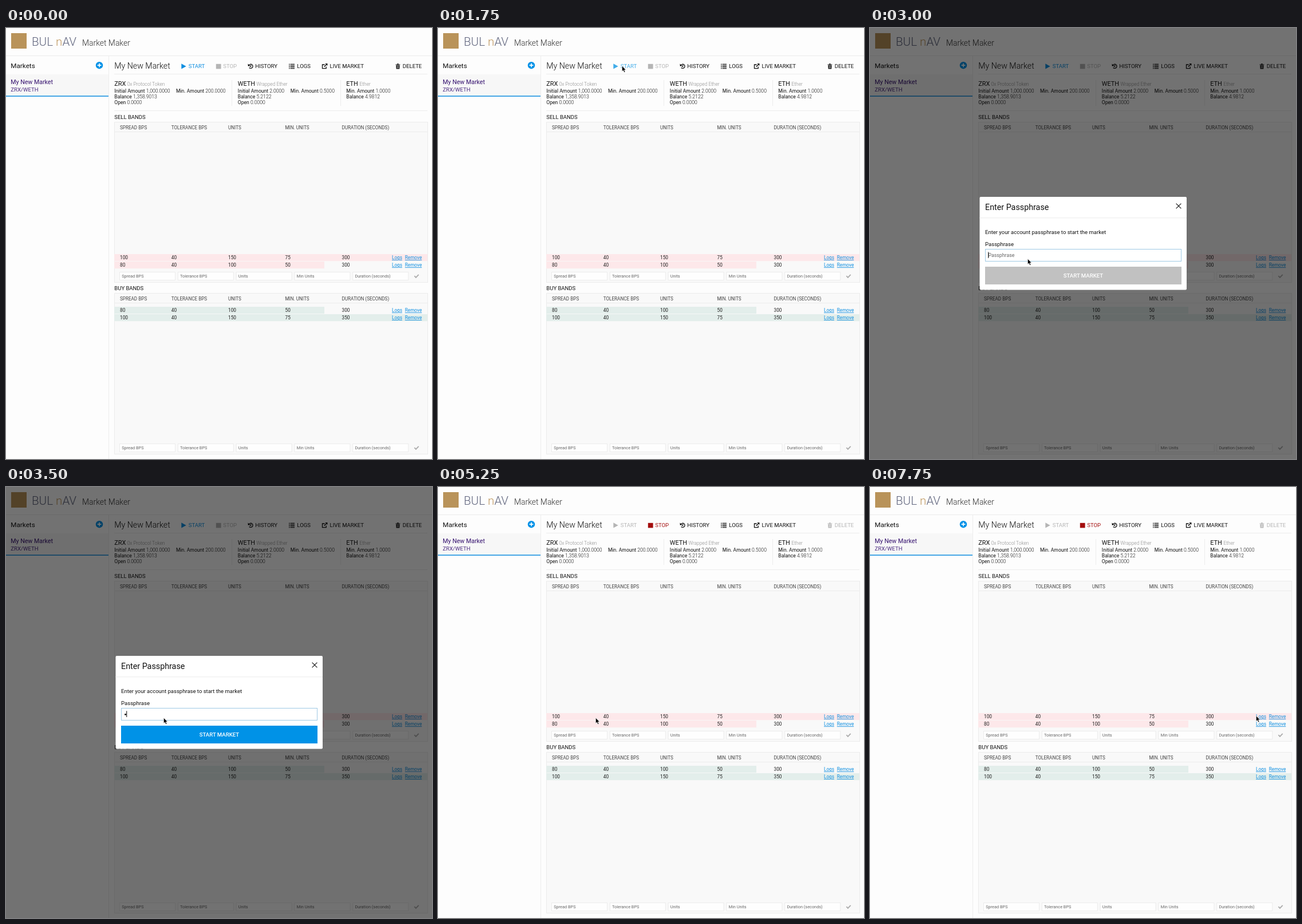
An HTML page that plays this animation: 744x753 px, repeating every 8 s.

```html
<!DOCTYPE html>
<html lang="en">
<head>
<meta charset="utf-8">
<title>Market Maker</title>
<style>
  html, body { margin: 0; width: 100%; height: 100%; overflow: hidden; background: #fdfdfd; }
  svg { display: block; width: 744px; height: 753px; font-family: Roboto, sans-serif; }
  text { white-space: pre; }
  .start { fill: var(--start); }
  .stop { fill: var(--stop); }
  .delete { fill: var(--delete); }
  .link { fill: #0d8ee0; text-decoration: underline; }
  .light { font-weight: 300; }
  .line { fill: none; stroke: #111; stroke-width: 1.3; }
</style>
</head>
<body>
<svg id="stage" viewBox="0 0 744 753"></svg>
<script>
const BLUE = '#0092e7', GREY = '#b5b5b5', RED = '#a30d0d', INK = '#111', RULE = '#ececec';
const LOOP = 8000;

const text = (x, y, size, str, fill = INK, extra = '') =>
  `<text x="${x}" y="${y}" font-size="${size}" fill="${fill}" ${extra}>${str}</text>`;
const rect = (x, y, w, h, fill, extra = '') =>
  `<rect x="${x}" y="${y}" width="${w}" height="${h}" fill="${fill}" ${extra}/>`;
const rule = (x1, y1, x2, y2) =>
  `<path d="M${x1} ${y1}L${x2} ${y2}" stroke="${RULE}"/>`;
const path = (d, extra = '') => `<path d="${d}" ${extra}/>`;

function header() {
  return rect(9, 9, 27, 27, '#b9935a')
    + text(45, 31, 20.6, 'BUL <tspan fill="#c19a62">n</tspan>AV', '#62677f', 'class="light"')
    + text(133, 31, 13.9, 'Market Maker', '#333', 'class="light"')
    + rule(0, 48.5, 744, 48.5);
}

function sidebar() {
  return rule(179.5, 49, 179.5, 753)
    + text(8.3, 69.5, 11.7, 'Markets')
    + `<circle cx="163" cy="65.2" r="6.2" fill="${BLUE}"/>`
    + path('M159.6 65.2h6.8M163 61.8v6.8', 'stroke="#fff" stroke-width="1.7"')
    + rect(0, 81, 179, 38, '#f7f7f7')
    + rect(0, 118.3, 179, 1.5, '#0d8ee0')
    + text(8.3, 97.6, 10.6, 'My New Market', '#34106e')
    + text(8.3, 111.2, 9.6, 'ZRX/WETH', '#4a2a80');
}

function toolbar() {
  const label = (x, str, cls = '') => text(x, 69.8, 9.56, str, INK, `class="${cls}"`);
  return text(189.3, 71.4, 14.2, 'My New Market', INK, 'class="light"')
    + path('M306.3 62.3l8.4 4.6-8.4 4.6z', 'class="start"') + label(318.8, 'START', 'start')
    + path('M366.8 62.8h8.8v8.6h-8.8z', 'class="stop"') + label(379.3, 'STOP', 'stop')
    + path('M424.3 65a3.6 3.6 0 1 1 .4 4.2M427.6 64.6v2.6h-1.8', 'class="line"')
    + path('M422.6 62.6v3.8h3.8z') + label(435.3, 'HISTORY')
    + path('M494 63.4h1.6m1 0h7.4M494 65.8h1.6m1 0h7.4M494 68.2h1.6m1 0h7.4M494 70.6h1.6m1 0h7.4', 'class="line"')
    + label(508.3, 'LOGS')
    + path('M556.6 64h-4.1v6.6h6.7v-3M555.6 67.8l4.6-4.6', 'class="line"')
    + path('M557.4 62h4v4z') + label(565.6, 'LIVE MARKET')
    + path('M680.5 63.4h2.2l.6-1.2h2.2l.6 1.2h2.2v1.2h-7.8zM681.2 65.2h6.4l-.4 6.4h-5.6z', 'class="delete"')
    + path('M683.2 66.3v4M684.4 66.3v4M685.6 66.3v4', 'stroke="#fff" stroke-width=".5"')
    + label(692.8, 'DELETE', 'delete')
    + rule(189, 80.5, 736, 80.5);
}

function balances() {
  const token = (x, width, symbol, name) =>
    text(x, 100.8, 10.9, symbol) + text(x + width, 100.8, 8.4, name, '#8a8a8a', 'class="light"');
  const stat = (x, row, name, value) =>
    text(x, 113.3 + row * 10, 8.6, `${name} <tspan class="light">${value}</tspan>`);
  return token(189.3, 22.4, 'ZRX', '0x Protocol Token')
    + stat(189.3, 0, 'Initial Amount', '1,000.0000') + stat(297, 0, 'Min. Amount', '200.0000')
    + stat(189.3, 1, 'Balance', '1,358.9013') + stat(189.3, 2, 'Open', '0.0000')
    + token(404.8, 32.7, 'WETH', 'Wrapped Ether')
    + stat(404.8, 0, 'Initial Amount', '2.0000') + stat(496.8, 0, 'Min. Amount', '0.5000')
    + stat(404.8, 1, 'Balance', '5.2122') + stat(404.8, 2, 'Open', '0.0000')
    + token(594.3, 23.3, 'ETH', 'Ether')
    + stat(594.3, 0, 'Min. Amount', '1.0000') + stat(594.3, 1, 'Balance', '4.9812')
    + rule(394.5, 91, 394.5, 136) + rule(584.5, 91, 584.5, 136)
    + rule(189, 144.5, 736, 144.5);
}

const COLUMNS = [199, 288.8, 388, 487.5, 586.5];
const HEADINGS = ['SPREAD BPS', 'TOLERANCE BPS', 'UNITS', 'MIN. UNITS', 'DURATION (SECONDS)'];
const FIELDS = ['Spread BPS', 'Tolerance BPS', 'Units', 'Min Units', 'Duration (seconds)'];

function bands(title, top, bottom, firstRow, color, rows) {
  const fieldTop = bottom - 19;
  return text(189.3, top - 4.8, 9.5, title)
    + rect(189.5, top + .5, 547, bottom - top - 1, '#f9f9f9', `stroke="${RULE}"`)
    + rule(189, top + 17.5, 736, top + 17.5)
    + HEADINGS.map((h, i) => text(COLUMNS[i], top + 12.7, 8.15, h, '#444')).join('')
    + rows.map((cells, r) => {
      const y = firstRow + r * 13;
      return rect(189, y, cells[2] === 150 ? 547 : 367, 12.2, color)
        + cells.map((c, i) => text(COLUMNS[i], y + 9.2, 8.25, c, '#222')).join('')
        + text(674, y + 9.2, 8.2, 'Logs', '', 'class="link"')
        + text(696.8, y + 9.2, 8.2, 'Remove', '', 'class="link"');
    }).join('')
    + FIELDS.map((f, i) => {
      const x = 198.5 + i * 101.8;
      return rect(x, fieldTop + .5, 97, 14, '#fefefe', `stroke="${RULE}"`)
        + text(x + 3.7, fieldTop + 10, 7.35, f, '#666');
    }).join('')
    + path(`M713.3 ${fieldTop + 7.2}l2.6 2.6 4.8-5`, 'fill="none" stroke="#adadad" stroke-width="1.9"');
}

function modal() {
  return '<g id="modal">'
    + rect(0, 0, 744, 753, '#000', 'opacity=".55"')
    + rect(191.5, 295, 361.5, 162.5, '#fff', 'rx="2"')
    + text(201, 318, 14.3, 'Enter Passphrase')
    + path('M534.6 306.6l8.8 8.8m0-8.8l-8.8 8.8', 'class="line" style="stroke-width:1.1"')
    + rule(191.5, 331.8, 553, 331.8)
    + text(201, 359.7, 9.5, 'Enter your account passphrase to start the market')
    + text(201, 381.2, 9.6, 'Passphrase')
    + rect(201.5, 386.5, 342, 21, '#fff', 'id="field"')
    + text(206.6, 400.2, 8.75, 'Passphrase', '#666', 'id="hint"')
    + '<g id="dots"></g>'
    + rect(0, 391.3, 1, 10.7, '#000', 'id="caret"')
    + rect(201, 417, 343, 31, BLUE, 'id="submit"')
    + text(372.4, 436.3, 9.6, 'START MARKET', '#fff', 'text-anchor="middle" font-weight="500"')
    + '</g>';
}

const $ = id => document.getElementById(id);
const stage = $('stage');
stage.innerHTML = header() + sidebar() + toolbar() + balances()
  + bands('SELL BANDS', 164, 445, 395, '#fde8ea', [[100, 40, 150, 75, 300], [80, 40, 100, 50, 300]])
  + bands('BUY BANDS', 463, 745, 487, '#e3eeeb', [[80, 40, 100, 50, 300], [100, 40, 150, 75, 350]])
  + modal()
  + '<g id="cursor">'
  + path('M.4 .3V9.8L2.6 7.9L4.2 11.5L5.9 10.8L4.3 7.3H7.2Z', 'id="arrow" stroke="#fff" stroke-width=".6"')
  + path('M1 .5Q3 .5 3.5 2Q4 .5 6 .5M3.5 2V13M1 14.5Q3 14.5 3.5 13Q4 14.5 6 14.5', 'id="beam" fill="none" stroke="#222"')
  + '</g>';

// [time, x, y, text beam]
const POINTER = [
  [250, 404, 84], [500, 414, 81, true], [1000, 389, 102], [1250, 326, 80], [1500, 308, 37],
  [1750, 321, 66], [2000, 325, 66], [2250, 349, 53], [2500, 293, 329.5], [2750, 281, 387, true],
  [3000, 275, 403], [7000, 501, 316.5], [7250, 554, 296], [7500, 636, 367], [7750, 674, 399.5]
];
// [time, characters typed]
const TYPED = [[0, 0], [3500, 1], [3750, 3], [4000, 4], [4250, 7], [4500, 9], [4750, 12]];

const latest = (keys, t) => keys.findLast(k => k[0] <= t);
const show = (id, on) => $(id).setAttribute('display', on ? 'inline' : 'none');

function draw(t) {
  const running = t >= 5250;
  const hovered = t >= 1750 && t < 2000;
  const focused = t >= 3000;
  const typed = latest(TYPED, t)[1];
  const pointer = latest(POINTER, t);

  stage.style.setProperty('--start', running ? GREY : hovered ? '#41ace9' : '#0d8ee0');
  stage.style.setProperty('--stop', running ? RED : GREY);
  stage.style.setProperty('--delete', running ? GREY : INK);

  show('modal', t >= 2000 && !running);
  show('hint', !typed);
  show('caret', focused);
  $('field').setAttribute('stroke', focused ? '#9fc9e4' : RULE);
  $('submit').setAttribute('fill', typed ? BLUE : '#c1c1c1');
  $('caret').setAttribute('x', 206.3 + typed * 3.95);
  $('dots').innerHTML = Array.from({ length: typed }, (_, i) =>
    `<circle cx="${208.5 + i * 3.95}" cy="397.4" r="1.45"/>`).join('');

  show('cursor', pointer);
  if (pointer) {
    const [, x, y, beam] = pointer;
    $('cursor').setAttribute('transform', `translate(${x} ${y})`);
    show('arrow', !beam);
    show('beam', beam);
  }
}

const origin = performance.now();
function tick() {
  draw((performance.now() - origin) % LOOP);
  requestAnimationFrame(tick);
}
tick();
</script>
</body>
</html>
```
